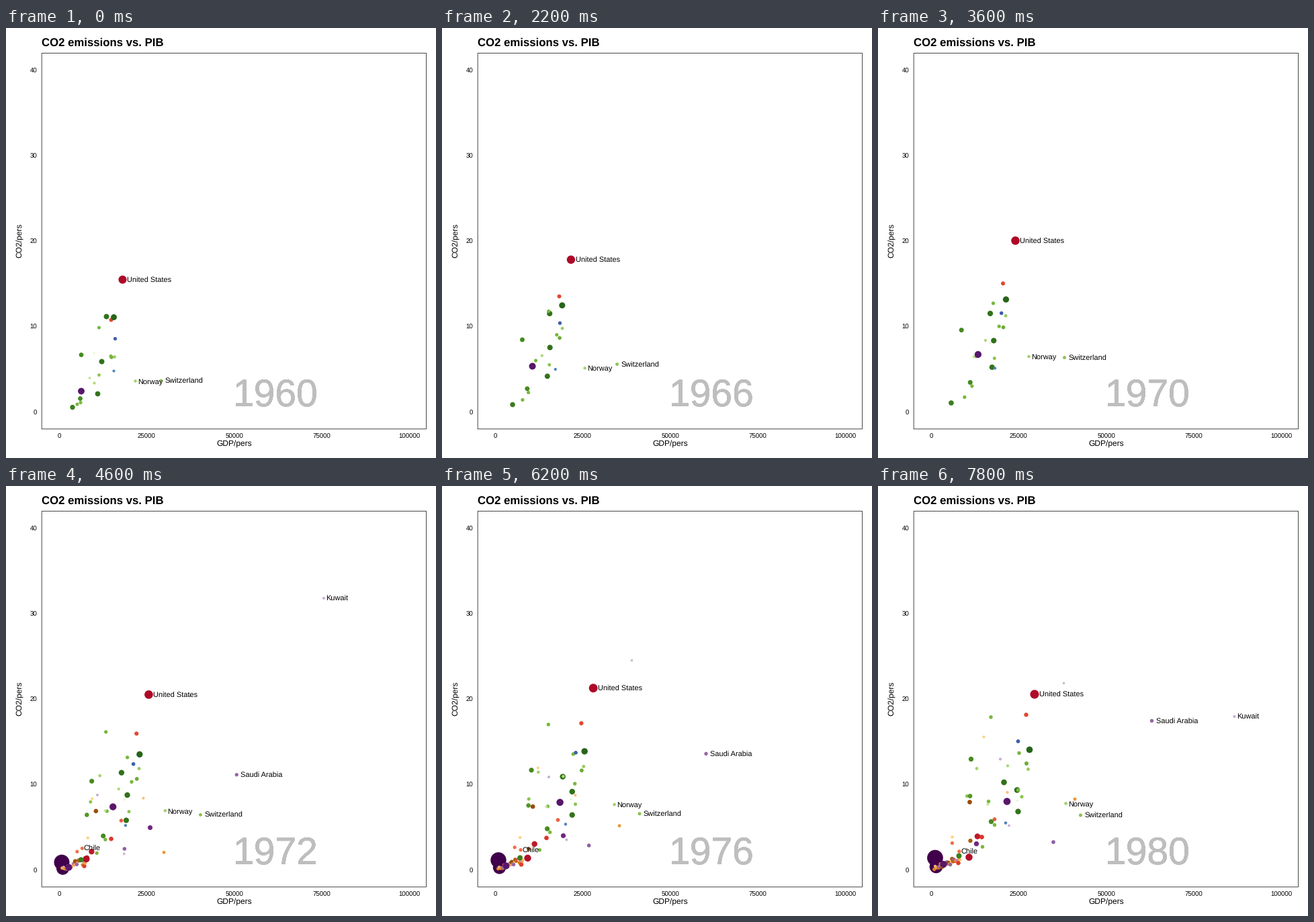
A matplotlib script for the animation above (8000 ms loop, 640 px wide and 640 px high).

```python
import numpy as np
import matplotlib.pyplot as plt
from matplotlib.animation import FuncAnimation
from matplotlib.colors import LinearSegmentedColormap
from matplotlib.patches import Rectangle

SIZE, DPI = 640, 80
PT = 72 / DPI                        # points per pixel
FRAMES, STEP = 40, 200
FIRST, LAST = 1960.5, 1980           # half a year passes per frame
ORIGIN = np.array([79, 571.3])       # pixel position of (0, 0)

plt.rcParams["font.family"] = "Liberation Sans"
plt.rcParams["text.hinting"] = "none"

fig = plt.figure(figsize=(SIZE / DPI, SIZE / DPI), dpi=DPI, facecolor="white")
ax = fig.add_axes([0, 0, 1, 1])
ax.set_xlim(0, SIZE)
ax.set_ylim(SIZE, 0)
ax.axis("off")


def write(x, y, s, px, **kw):
    kw.setdefault("va", "baseline")
    return ax.text(x, y, s, fontsize=px * PT, **kw)


def ramp(*colors):
    return LinearSegmentedColormap.from_list("", colors)


# one palette per continent; larger populations are darker
RADII = [1.3, 2.1, 2.6, 3.4, 4.5, 9]
EUROPE = ramp("#E6F5D0", "#B8E186", "#7FBC41", "#4D9221", "#276419", "#276419")
AMERICA = ramp("#FEE8A0", "#FDD07A", "#F46D43", "#D73027", "#B5102A", "#A50026")
AFRICA = ramp("#FEE0B6", "#FDB863", "#E08214", "#8F450A", "#7F3B08", "#7F3B08")
ASIA = ramp("#DCDCE0", "#C2A5CF", "#9970AB", "#762A83", "#5C1A70", "#40004B")
OCEANIA = ramp("#74ADD1", "#4575B4", "#313695", "#313695")

dots = []


def dot(palette, r, *path, years=(FIRST, LAST), since=FIRST, boom=0, label=None):
    """A country on a straight path; boom lifts its emissions in mid-period."""
    shade = float(np.interp(r, RADII, np.linspace(0, 1, len(RADII))))
    text = label and write(0, 0, label, 11, zorder=4)
    dx = 0.1 * text.get_window_extent().width if text else 0
    dots.append(dict(r=r, color=palette(shade), path=np.array(path, float),
                     years=years, since=since, boom=boom, text=text, dx=dx))


def newcomer(palette, r, p, q, **kw):
    """A country that joins in 1970, given by its places in 1974 and 1980."""
    dot(palette, r, p, q, years=(1974, LAST), since=1970, **kw)


def place(d, t):
    years, path = d["years"], d["path"]
    i = np.clip(np.searchsorted(years, t) - 1, 0, len(years) - 2)
    u = (t - years[i]) / (years[i + 1] - years[i])
    x, y = path[i] + u * (path[i + 1] - path[i])
    return x, y - d["boom"] * np.sin(np.pi * (t - FIRST) / (LAST - FIRST))


# the two giants, then the crowd of small economies along the growth line
newcomer(ASIA, 11.6, (83, 558), (84.5, 553))
newcomer(ASIA, 9.6, (84.5, 568), (86, 566))
rng = np.random.default_rng(11)
for k in range(30):
    d = 4 + 1.25 * k
    p = ORIGIN + (d, -min(0.45 * d, 12) + rng.uniform(-4, 6) * d / (d + 8))
    palette = (AFRICA, AFRICA, ASIA, AMERICA)[k % 4]
    newcomer(palette, rng.uniform(1.9, 3.3), p, p + (0.06 * d, rng.normal(-1, 2)))
newcomer(ASIA, 5, (94, 566), (97, 562.5))

# newcomers away from the crowd
newcomer(EUROPE, 2.7, (153, 360), (167.5, 343.5))
newcomer(EUROPE, 2.5, (127, 467.5), (132, 461))
newcomer(EUROPE, 3.3, (124, 482), (136.5, 461))
newcomer(AMERICA, 2, (135, 442), (157, 373))
newcomer(EUROPE, 2.3, (141, 428), (146.5, 420))
newcomer(AMERICA, 2.1, (118.5, 523), (110, 522))
newcomer(AMERICA, 2.6, (106.5, 540.5), (110, 531))
newcomer(AMERICA, 4.2, (132, 538), (147.5, 521))
newcomer(AMERICA, 3.3, (155.5, 524), (154, 522))
newcomer(AMERICA, 2.8, (171.5, 497), (173, 495.5))
newcomer(AFRICA, 3.3, (134, 480), (136, 470))
newcomer(AFRICA, 3.1, (124.5, 546), (137, 527.5))
newcomer(AFRICA, 2.4, (249, 525), (292.5, 465.5))
newcomer(AFRICA, 2, (201, 462), (192, 455.5))
newcomer(ASIA, 3.6, (197, 514), (146, 532))
newcomer(ASIA, 2.8, (197, 537), (260.5, 529.5))
newcomer(ASIA, 2, (147, 446), (181.5, 406))
newcomer(ASIA, 1.9, (180, 536.5), (194.5, 505))
newcomer(AMERICA, 5.1, (123, 554), (135, 552))
newcomer(AMERICA, 2.6, (114.7, 540), (120.3, 543.5), label="Chile")

# countries present from the start
dot(AMERICA, 3.1, (156, 434), (220, 340), boom=11)
dot(EUROPE, 4.7, (160, 430), (225, 392), boom=9)
dot(EUROPE, 4.2, (149, 429), (187, 440.5), boom=10)
dot(EUROPE, 4.2, (142, 496), (206.5, 452), boom=11)
dot(EUROPE, 4.1, (136, 544), (208, 484), boom=12)
dot(EUROPE, 3.9, (98.5, 564), (120, 550))
dot(EUROPE, 3.6, (110, 551), (168, 499))
dot(EUROPE, 3.6, (111.5, 486), (138, 406))
dot(EUROPE, 2.9, (156.5, 489.5), (220.5, 412.5), boom=9)
dot(EUROPE, 2.7, (155.5, 488), (208, 452), boom=28)
dot(EUROPE, 2.7, (138, 445.5), (209.5, 397), boom=14)
dot(EUROPE, 2.7, (110.5, 557), (173, 504))
dot(EUROPE, 2.7, (105.5, 559.5), (155, 536.5))
dot(EUROPE, 2.7, (139, 494.5), (164, 469), years=(1966, LAST), since=1965)
dot(EUROPE, 2.5, (138, 516), (213.5, 462))
dot(EUROPE, 2.4, (161, 489), (223, 421), boom=30)
dot(EUROPE, 2.2, (131, 528), (192.5, 416), boom=12)
dot(EUROPE, 2, (124, 520.5), (163, 473), boom=10)
dot(EUROPE, 1.4, (131, 483.5), (207, 467.5), boom=8)
dot(ASIA, 5.2, (111.5, 540), (191.5, 469), boom=22)
dot(OCEANIA, 2.8, (162, 462), (208, 379.5))
dot(OCEANIA, 2.2, (160, 510), (189.5, 501))

# labelled countries follow a few turning points
dot(AMERICA, 6.4, (173, 374), (182.5, 364.5), (204, 316), (231, 295.5), (232.5, 309.5),
    years=(FIRST, 1963.5, 1969.5, 1978, LAST), label="United States")
dot(EUROPE, 2.3, (192, 525), (203.5, 518), (224, 488.5), (266, 469), (279, 472),
    years=(FIRST, 1963.5, 1969.5, 1978, LAST), label="Norway")
dot(EUROPE, 2.5, (230, 524.5), (248, 507), (277, 490), (298.5, 488), (288.5, 486.5),
    (301, 489.5), years=(FIRST, 1963.5, 1969.5, 1974, 1978, LAST), label="Switzerland")
dot(ASIA, 2.7, (300, 465), (385.5, 393.5), (399.5, 402.5), (407, 349),
    years=(1970, 1974, 1978, LAST), since=1970, label="Saudi Arabia")
dot(ASIA, 1.8, (262, 325), (285, 299), (282, 259), (277, 266), (276, 293),
    years=(1970, 1974, 1976, 1978, LAST), since=1970)
# Kuwait leaves the axis range after 1973 and is back in 1980
dot(ASIA, 2, (481, 147), (477, 138), (468, 195),
    years=(1970, 1971, 1973), since=1970, label="Kuwait")
dot(ASIA, 2, (530, 342.5), (530, 342.5),
    years=(LAST, LAST + 1), since=LAST, label="Kuwait")

# frame, axes and titles
ax.add_patch(Rectangle((53.2, 37.4), 572.3, 559.4, fill=False, ec="#333333",
                       lw=.9 * PT, snap=False))
write(53, 27, "CO2 emissions vs. PIB", 16.8, weight="bold")
write(340, 623, "GDP/pers", 12, ha="center")
write(20.3, 316.5, "CO2/pers", 12, ha="center", va="center", rotation=90)
for i in range(5):
    write(ORIGIN[0] + 130.4 * i, 611, str(25000 * i), 9.6, ha="center")
    write(46, 575.5 - 127.2 * i, str(10 * i), 9.6, ha="right")

# the year is overprinted, which hardens its edges
stamps = [write(337.6, 563.3, "", 57, color="#BEBEBE", zorder=1) for _ in range(8)]
cloud = ax.scatter([], [], linewidths=0, zorder=3)


def draw(n):
    t = FIRST + n / 2
    for s in stamps:
        s.set_text(str(round(t)))
    shown = [d for d in dots if d["since"] <= t <= d["years"][-1]]
    spots = np.array([place(d, t) for d in shown]) + 0.5
    radii = np.array([d["r"] for d in shown]) * (1 + 0.002 * (n - 27))
    cloud.set_offsets(spots)
    cloud.set_sizes((2 * radii * PT) ** 2)
    cloud.set_facecolors([d["color"] for d in shown])
    for d in dots:
        if d["text"]:
            d["text"].set_visible(False)
    for d, (x, y) in zip(shown, spots):
        if d["text"]:
            d["text"].set_visible(True)
            d["text"].set_position((x + d["dx"], y + 4))
    return [cloud, *stamps]


anim = FuncAnimation(fig, draw, frames=FRAMES, interval=STEP, repeat=True,
                     repeat_delay=0, blit=False)
plt.show()
```
